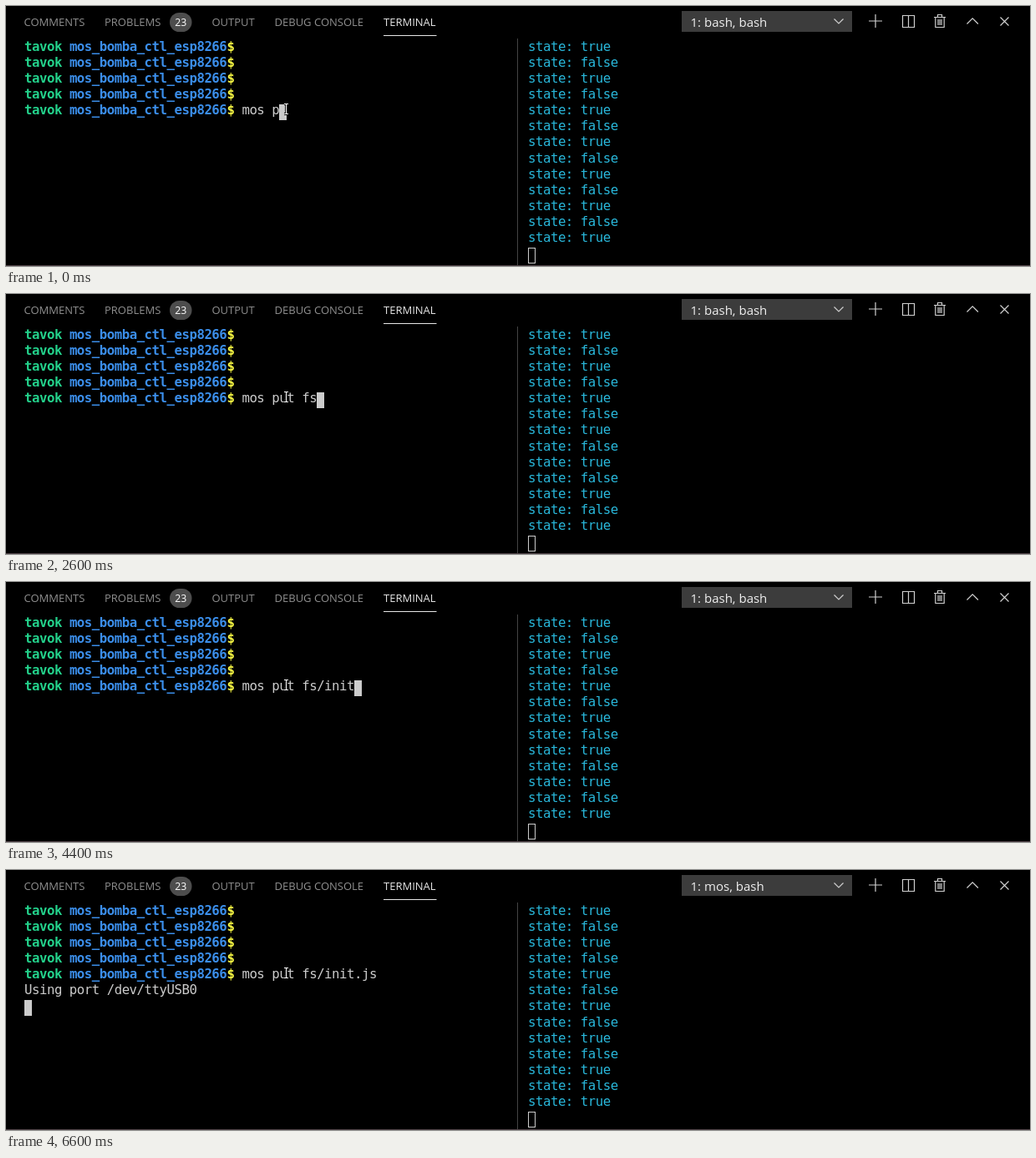
An HTML page for the animation above (8000 ms loop, 1226 by 312 pixels).

```html
<!DOCTYPE html>
<html lang="en">
<head>
<meta charset="utf-8">
<title>Terminal</title>
<style>
html, body { margin: 0; width: 100%; height: 100%; overflow: hidden; background: #000; }
svg { display: block; width: 1226px; height: 312px; }
text { white-space: pre; }
.tabs { font: 13px "Open Sans", "Noto Sans", sans-serif; fill: #8f8f8f; }
.tabs .on { fill: #e7e7e7; }
.tabs .count { font-size: 12.3px; fill: #fff; text-anchor: middle; }
.pick { font: 15px "Open Sans", "Noto Sans", sans-serif; fill: #f0f0f0; }
.icons { fill: none; stroke: #cfcfcf; stroke-width: 1.2; }
.term { font: 15.7px "DejaVu Sans Mono", "Liberation Mono", monospace; letter-spacing: -0.472px; fill: #ccc; }
.user { fill: #23d18b; font-weight: bold; }
.dir { fill: #3b8eea; font-weight: bold; }
.sign { fill: #f5f543; font-weight: bold; }
.log { fill: #29b8db; }
</style>
</head>
<body>
<svg viewBox="0 0 1226 312">
  <rect width="1226" height="312"/>

  <g class="tabs">
    <text x="21.5" y="24">COMMENTS</text>
    <text x="118" y="24">PROBLEMS</text>
    <rect x="196" y="8" width="26.5" height="23" rx="11.5" fill="#4d4d4d"/>
    <text class="count" x="209.2" y="24">23</text>
    <text x="246.5" y="24">OUTPUT</text>
    <text x="321.5" y="24">DEBUG CONSOLE</text>
    <text class="on" x="452" y="24">TERMINAL</text>
    <rect x="452" y="35" width="63.5" height="1" fill="#e7e7e7"/>
  </g>

  <rect x="809" y="6" width="204" height="25" fill="#3c3c3c"/>
  <text class="pick" id="pick" x="819.5" y="24.5"></text>

  <g class="icons">
    <path d="M991.5 15.5l5.5 5.5 5.5-5.5"/>
    <path d="M1041 10v16M1033 18h16"/>
    <path d="M1073.5 11.5h14v14h-14zM1080.5 11.5v14"/>
    <path d="M1111 13.5h14M1115.5 13v-2.5h5v2.5M1112.8 13.5v12h10.4v-12M1116 16v7M1118 16v7M1120 16v7"/>
    <path d="M1150.5 21.5l6.7-6.7 6.7 6.7"/>
    <path d="M1190.5 13.5l10 10M1200.5 13.5l-10 10"/>
  </g>

  <rect x="612" y="39" width="1" height="272" fill="#444"/>
  <rect y="311" width="1226" height="1" fill="#4d4045"/>

  <g class="term" id="term"></g>
  <rect id="cursor" width="9" height="19" fill="#ccc"/>
  <rect x="625.5" y="290.5" width="8" height="18" fill="none" stroke="#ccc"/>

  <g fill="none">
    <path id="beam" d="M333 117.5h5M335.5 117.5v12M333 129.5h5" stroke="#000" stroke-width="2.6"/>
    <use href="#beam"/>
    <path d="M333 117.5h5M335.5 117.5v12M333 129.5h5" stroke="#fff" stroke-width="1.1"/>
  </g>
</svg>
<script>
const LOOP = 8000, COL = 8.98, ROW = 19.08, LEFT = 22, RIGHT = 625, PROMPT = 29;
const COMMAND = 'mos put fs/init.js';
const ENTER = 6600;
// [time, characters typed]
const KEYS = [[0, 5], [200, 6], [1800, 8], [2200, 9], [2600, 10], [3800, 12], [4000, 13],
  [4200, 14], [4400, 15], [5400, 16], [6000, 17], [6200, 18]];
const FLIPS = [800, 1800, 2800, 3800, 4800, 6000];

const $ = id => document.getElementById(id);

function addText(col, row, cls, str, x0 = LEFT) {
  const el = document.createElementNS('http://www.w3.org/2000/svg', 'text');
  el.setAttribute('x', x0 + col * COL);
  el.setAttribute('y', 54 + row * ROW);
  el.setAttribute('class', cls);
  el.textContent = str;
  $('term').append(el);
  return el;
}

function setText(el, str) {
  if (el.textContent !== str) el.textContent = str;
}

for (let row = 0; row < 5; row++) {
  addText(0, row, 'user', 'tavok');
  addText(6, row, 'dir', 'mos_bomba_ctl_esp8266');
  addText(27, row, 'sign', '$');
}
const input = addText(PROMPT, 4, '', '');
const reply = addText(0, 5, '', '');
const log = Array.from({ length: 13 }, (_, row) => addText(0, row, 'log', '', RIGHT));

function draw(t) {
  const typed = KEYS.filter(k => k[0] <= t).pop()[1];
  const flips = FLIPS.filter(f => f <= t).length;
  const sent = t >= ENTER;
  setText(input, COMMAND.slice(0, typed));
  setText(reply, sent ? 'Using port /dev/ttyUSB0' : '');
  setText($('pick'), sent ? '1: mos, bash' : '1: bash, bash');
  log.forEach((el, row) => setText(el, 'state: ' + ((row + flips) % 2 === 0)));
  $('cursor').setAttribute('x', Math.round(LEFT + (sent ? 0 : PROMPT + typed) * COL));
  $('cursor').setAttribute('y', Math.round(41.7 + (sent ? 6 : 4) * ROW));
}

const start = performance.now();
function tick() {
  draw((performance.now() - start) % LOOP);
  requestAnimationFrame(tick);
}
tick();
</script>
</body>
</html>
```
